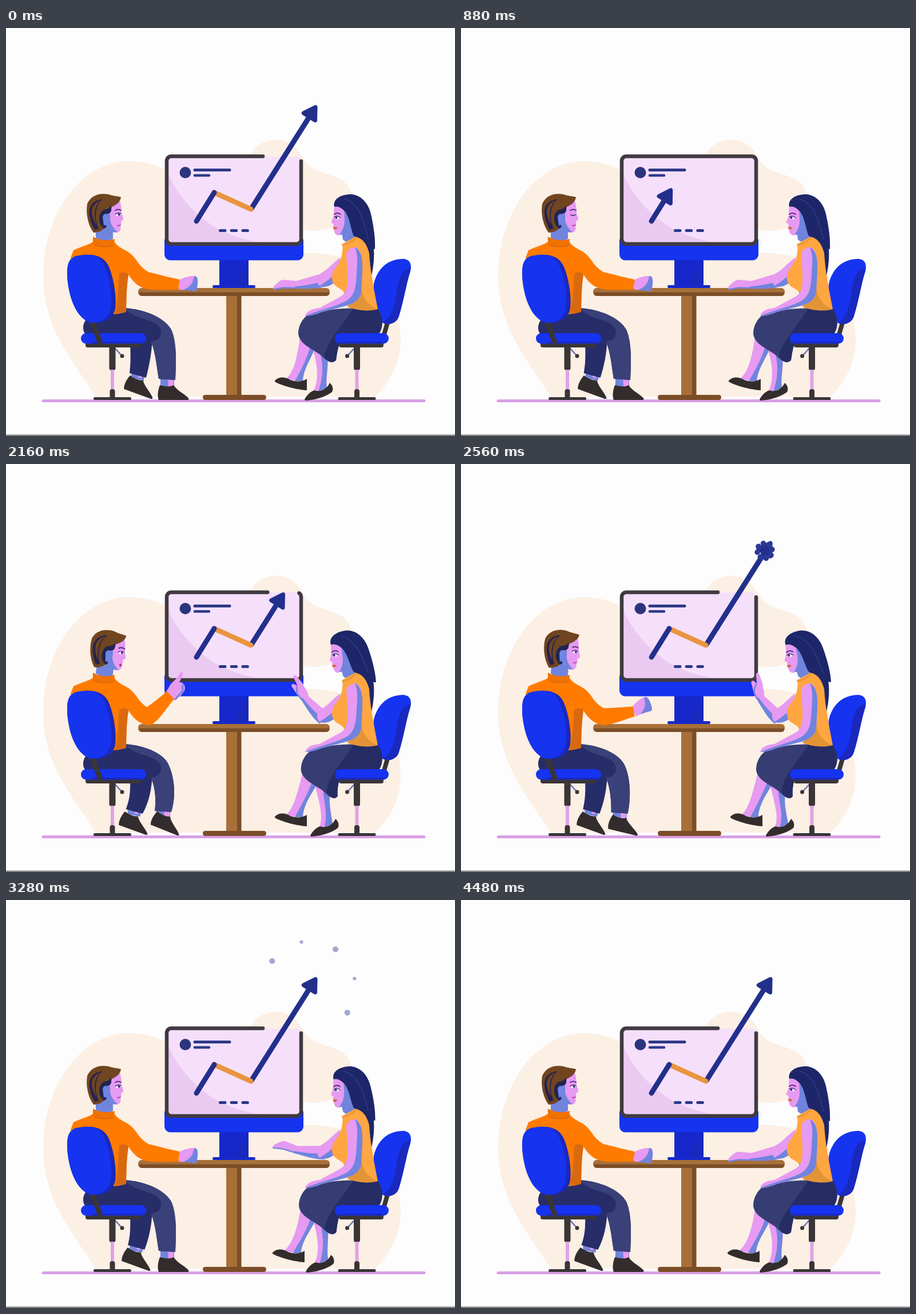
An HTML page with a canvas that plays this animation: 785x714 px, repeating every 4.56 s.

```html
<!DOCTYPE html>
<html lang="en">
<head>
<meta charset="utf-8">
<title>Growth meeting</title>
<style>
html, body { margin: 0; width: 100%; height: 100%; overflow: hidden; background: #fdfdfd; }
canvas { display: block; filter: blur(0.5px); }
</style>
</head>
<body>
<canvas id="stage" width="785" height="714"></canvas>
<script>
const ctx = document.getElementById('stage').getContext('2d');
const LOOP = 4560, STEP = 80, RAD = Math.PI / 180;
const NAVY = '#22308c', BLUE = '#1633f0', DEEP = '#1a28be', DARK = '#3a3536', SHOE = '#332c2c';
const PINK = '#e69af2', SHADE = '#7184dd', ORANGE = '#ff7b00', AMBER = '#ffa640';
const WOOD = '#a87039', BARK = '#7b4e28', HAIR = '#1d2668', LEG = '#3a4179', LEG2 = '#272d68';

// Eased value from a flat list of time, value pairs.
function key(t, ...k) {
  if (t <= k[0]) return k[1];
  for (let i = 2; i < k.length; i += 2) {
    if (t <= k[i]) {
      const u = (t - k[i - 2]) / (k[i] - k[i - 2]);
      return k[i - 1] + (k[i + 1] - k[i - 1]) * u * u * (3 - 2 * u);
    }
  }
  return k[k.length - 1];
}
const ramp = (t, a, b) => Math.min(1, Math.max(0, (t - a) / (b - a)));

function shape(color, d) {
  ctx.fillStyle = color;
  ctx.fill(new Path2D(d));
}
function line(color, width, d, cap = 'round') {
  ctx.strokeStyle = color;
  ctx.lineWidth = width;
  ctx.lineCap = cap;
  ctx.lineJoin = 'round';
  ctx.stroke(new Path2D(d));
}
function box(color, x, y, w, h, r = 0) {
  ctx.fillStyle = color;
  ctx.beginPath();
  ctx.roundRect(x, y, w, h, r);
  ctx.fill();
}
function dot(color, x, y, r) {
  ctx.fillStyle = color;
  ctx.beginPath();
  ctx.arc(x, y, r, 0, 7);
  ctx.fill();
}
function pose(x, y, deg, draw) {
  ctx.save();
  ctx.translate(x, y);
  ctx.rotate(deg * RAD);
  draw();
  ctx.restore();
}
const turn = (x, y, deg, draw) => pose(x, y, deg, () => { ctx.translate(-x, -y); draw(); });

function backdrop() {
  box('#fdfdfd', 0, 0, 785, 714);
  shape('#fcefe4', `M157 645C112 575 62 520 65 425C70 310 140 233 215 233C250 234 272 243 290 255
    L400 300L428 220C440 201 458 195 474 196C500 197 512 212 522 232C535 252 562 254 582 263
    C604 274 611 300 602 322C592 345 565 355 535 355L515 353V394C545 392 580 398 604 407
    C655 432 690 490 690 545C690 585 672 620 645 645Z`);
  line('#d99fe5', 5, 'M65 652.5H731');
  box('#858585', 0, 711.5, 785, 2.5);
}

function monitor(t, gap) {
  box(BLUE, 277, 370, 243, 36.5, [0, 0, 10, 10]);
  box('#1628cc', 373, 406, 51, 47);
  shape('#1a28bb', 'M396 453L424 408V453Z');
  box('#1729cb', 361, 450, 75, 5, 2.5);
  box('#f5dffb', 281, 225, 235, 153, 8);
  shape('#ebcaf1', 'M284 255C298 292 336 334 375 354C405 368 430 373 450 377H284Z');

  const frame = new Path2D('M485 224.5H508A8 8 0 0 1 516 232.5V370A8 8 0 0 1 508 378H289A8 8 0 0 1 281 370V232.5A8 8 0 0 1 289 224.5Z');
  const size = 763;
  ctx.save();
  if (gap > 0) {
    ctx.setLineDash([size - 2 * gap, 2 * gap]);
    ctx.lineDashOffset = -gap;
  }
  ctx.strokeStyle = '#403a40';
  ctx.lineWidth = 6.5;
  ctx.lineCap = 'round';
  ctx.stroke(frame);
  ctx.restore();

  dot('#2c357c', 313.5, 253, 10);
  line('#2c3a86', 5, 'M330 248.5H391');
  line('#2c3a86', 4.5, 'M330 258H355');
  const warm = t >= 1280 && t < 1840;
  for (let i = 0; i < 3; i++) line(i && warm ? '#e8953f' : '#2c3a86', 5, `M${374.5 + i * 19.7} 354.5h8.5`);
}

const LEGS = [
  { x: 333, y: 338, ex: 364, ey: 288, color: NAVY, head: NAVY },
  { x: 364, y: 288, ex: 428, ey: 317, color: '#e8953f', head: '#cb8239' },
  { x: 429, y: 316, ex: 530, ey: 156, color: NAVY, head: NAVY }
];
function arrow(t) {
  let on = 2, reach = 212;
  if (t >= 640 && t < 1200) { on = 0; reach = 66 * ramp(t, 600, 880); }
  else if (t >= 1200 && t < 1840) { on = 1; reach = 78 * ramp(t, 1120, 1520); }
  else if (t >= 1840 && t < 2480) reach = 212 * ramp(t, 1840, 2480);

  for (let i = on; i >= 0; i--) {
    const s = LEGS[i];
    const a = Math.atan2(s.ey - s.y, s.ex - s.x);
    const base = Math.max(0, reach - 24);
    const x = i < on ? s.ex : s.x + Math.cos(a) * base;
    const y = i < on ? s.ey : s.y + Math.sin(a) * base;
    line(s.color, 9, `M${s.x} ${s.y}L${x} ${y}`);
    if (i === on) pose(x, y, a / RAD, () => {
      const k = Math.min(1, reach / 24);
      ctx.scale(k, k);
      shape(s.head, 'M2 -12L22 0L2 12Z');
      line(s.head, 7, 'M2 -12L22 0L2 12Z');
    });
  }
}

function burst(t) {
  const u = ramp(t, 2480, 3440);
  if (u === 0 || u === 1) return;
  const far = 82 * (1 - (1 - u) ** 2);
  for (let i = 0; i < 8; i++) {
    const fade = Math.min(1, i > 4 ? 1.6 - u * 6.4 : (1.06 - u) * 1.9);
    if (fade <= 0) continue;
    const a = (214.5 + i * 45) * RAD;
    ctx.globalAlpha = fade;
    dot('#2c3894', 531 + far * Math.cos(a), 152 + far * Math.sin(a), i % 2 ? 5 - 2.4 * u : 5);
  }
  ctx.globalAlpha = 1;
}

function table() {
  box(WOOD, 385, 467, 20, 177);
  box(BARK, 404, 467, 7.5, 177);
  box(BARK, 344, 642, 111, 9, 4.5);
  box(WOOD, 231, 455, 335, 14, 6);
  box(BARK, 233, 462.5, 332, 6.5, [1, 1, 5, 5]);
}

function stem(x, side) {
  line('#6874bd', 2.5, `M${x + side * 5} 561L${x + side * 16} 573`);
  dot(DARK, x + side * 17, 574, 3.5);
  box(DARK, x - 5.5, 556, 11, 43, 4);
  box('#dfa4e4', x - 3, 598, 6, 36);
  box(DARK, x - 4.5, 632, 9, 17, 4);
  box(DARK, x - 33, 646, 66, 5, 2.5);
}
function leftChair() {
  stem(186, 1);
  box(DARK, 139, 549, 97, 10, 4);
  box(BLUE, 131, 534, 114, 18.5, 9);
  line(DEEP, 3, 'M152 550.5H237');
  line(DARK, 9, 'M150 512L165 552', 'butt');
  shape(DEEP, `M130 398C147 395 168 396 178 414C188 433 194 472 191 491C188 508 174 516 153 516
    C130 512 113 485 108 445C105 415 108 400 130 398Z`);
  shape(BLUE, `M129 398C147 395 162 397 171 414C182 437 187 470 183 490C180 506 168 516 150 516
    C129 512 113 485 108 445C105 415 108 400 129 398Z`);
}
function rightChairBack() {
  line(DARK, 8, 'M668 512L660 540', 'butt');
  shape(BLUE, `M643 448C650 418 670 404 695 404C706 405 710 413 707 426C699 450 695 478 687 504
    C683 518 667 521 657 515C644 504 640 475 643 448Z`);
  shape(DEEP, `M707 420C700 450 695 478 687 504C683 518 667 521 659 516C682 500 680 470 686 445
    C690 430 696 422 707 420Z`);
}
function rightChairSeat() {
  stem(613.5, -1);
  box(DARK, 582, 549, 78, 10, 4);
  box(BLUE, 575, 534, 94, 18.5, 9);
  line(DEEP, 3, 'M584 550.5H660');
}

// Shoe with its toe tip at the local origin.
function shoe(x, y, deg) {
  pose(x, y, deg, () => shape(SHOE, 'M-53 0C-56 -8 -54 -18 -51 -26C-44 -24 -34 -22 -27 -26C-21 -16 -6 -10 0 -2L-2 0Z'));
}

function manHead(lean, blink, talk) {
  turn(171, 366, lean * 8, () => {
    shape(SHADE, 'M157 345L187 345L187 369C178 374 164 373 157 368Z');
    shape(PINK, `M178 308L199 303C202 311 202 319 202 323C203 328 206 333 205 336L201 338
      C202 341 202 344 200 346C202 352 199 358 193 358C185 358 178 352 173 342Z`);
    shape(SHADE, 'M172 318C181 318 183 326 182 337C184 346 189 352 195 357C186 359 176 355 169 345Z');
    shape('#704520', `M153 358C144 346 139 325 142 308C148 293 163 288 179 291C186 294 194 294 201 296
      C200 304 194 309 185 313C183 319 182 321 180 325C175 320 169 322 168 331C167 339 170 345 172 350
      C167 356 160 358 153 358Z`);
    shape('#232350', 'M162 351C155 335 154 313 168 300C159 300 148 306 146 319C145 333 151 345 155 353Z');
    shape('#704520', 'M158 344C153 327 154 313 165 302C156 305 150 312 150 321C150 331 154 339 158 344Z');
    shape('#202452', 'M172 351C162 345 160 329 168 320C174 316 179 319 183 311C187 323 180 325 177 325C170 330 171 340 176 348Z');
    shape('#6f86e4', 'M169 331C170 324 177 323 178 330C178 338 175 345 171 346Z');
    line('#523382', 2, 'M191 319Q196 316 201 319');
    if (blink) line('#523382', 1.8, 'M192 327Q196 329 200 327');
    else {
      shape('#fff', 'M191 328Q196 322 201 326Q197 331 191 328Z');
      dot('#2b2f75', 197.5, 326.5, 2);
      line('#523382', 1.4, 'M191 326Q196 322 201 325');
    }
    if (talk) dot('#a83d8f', 198, 348, 2.4);
    else line('#b04b9f', 1.8, 'M195 346L200 345');
  });
}

function man(t) {
  const lean = key(t, 960, 0, 1520, 0.62, 2160, 1, 2560, 0.62, 3120, 0);
  const point = key(t, 1000, 0, 1400, 1, 2240, 1, 2760, 0);
  const step = key(t, 0, 0, 880, -2, 1520, -5, 2160, -9, 2560, -4, 3280, -4, 4480, -8);
  const hem = -7 * lean, lift = -7 * lean, knee = -4 * lean;

  shape(SHADE, `M${219 + step * 0.7} 598h25l-3 19l-22 -4Z`);
  line(PINK, 6, `M${235 + step * 0.7} 606l-1 6`, 'butt');
  shoe(256 + step, 650, 20);
  shape(LEG2, `M217 540H256C255 570 250 592 ${245 + step * 0.7} 612L${216 + step * 0.7} 604C219 580 217 565 217 540Z`);

  shape(SHADE, `M${270 + hem} ${608 + lift}h24v20h-24Z`);
  shape(PINK, `M${283 + hem} ${608 + lift}h10v20h-9Z`);
  shoe(320 - 18 * lean, 651, 22 * lean);
  shape(LEG2, `M137 515C145 499 180 492 207 490C245 492 278 508 ${289 + knee} 528
    C${298 + knee} 548 298 580 ${296 + hem} ${616 + lift}L${267 + hem} ${614 + lift}
    C263 590 261 565 253 548L235 536H139C134 530 134 522 137 515Z`);
  shape(LEG, `M207 491C248 494 278 508 ${289 + knee} 528C${298 + knee} 548 298 580 ${296 + hem} ${616 + lift}
    L${267 + hem} ${614 + lift}C263 590 261 565 253 548C270 550 279 530 262 518C247 508 229 510 207 491Z`);

  shape(ORANGE, `M118 389C134 381 148 379 153 373H189C193 381 202 385 211 391L226 412L214 432
    C210 460 210 480 210 497C190 503 170 500 150 508L113 402Z`);
  shape('#d9690f', 'M198 430C205 425 212 428 214 431C210 455 211 480 210 497L190 500C196 480 196 455 198 430Z');

  manHead(lean, t >= 800 && t < 960, t >= 1440 && t < 2320 && t % 640 < 320);
  shape('#f07200', 'M152 365C163 372 179 373 190 369L189 381C177 384 163 383 152 379Z');
  line('#d9690f', 2, 'M155 380Q171 385 188 381');

  shape(ORANGE, `M185 384C203 383 218 392 227 405C236 419 246 427 260 432L252 457
    C232 457 219 441 211 426L188 412Z`);
  pose(249, 442, 7.5 - 51.5 * point, () => {
    if (point > 0.45) {
      shape(PINK, 'M50 -9L65 -13C71 -15 76 -12 92 -16C98 -17 98 -12 93 -10L81 -6C86 0 84 8 77 11L66 13L50 10Z');
      line(SHADE, 3, 'M55 11L75 9L81 2');
    } else turn(54, 0, -24 * point, () => {
      shape(PINK, 'M53 -8C62 -14 70 -18 81 -19C87 -16 87 -3 85 6L55 9Z');
      shape(SHADE, 'M78 -17C83 -20 87 -15 86 4L84 8H63C72 2 78 -3 78 -17Z');
    });
    shape(ORANGE, 'M-3 -15C15 -13 38 -10 54 -9V9C35 11 17 16 0 15C-18 14 -18 -12 -3 -15Z');
  });
}

function womanHead(lean, blink) {
  shape(HAIR, 'M617 345L640 372C646 390 643 415 639 434C636 415 630 395 620 382Z');
  turn(602, 367, lean * -7, () => {
    shape(SHADE, 'M584 340H607L610 371C601 378 592 374 589 370Z');
    shape(PINK, `M575 309C572 317 574 324 573 328C572 333 568 339 569 341L573 343L572 348
      L574 351C573 357 575 362 581 363C592 361 601 353 606 342L600 315Z`);
    shape(SHADE, 'M592 318C590 331 597 343 583 362C595 362 604 355 609 342Z');
    shape(HAIR, `M574 313C571 300 584 291 604 291C624 293 636 311 639 330C643 349 646 369 645 387
      C631 385 615 377 607 362C602 347 601 334 594 323C588 316 582 311 574 313Z`);
    line('#303a8a', 1.5, 'M592 299C614 306 624 328 633 369');
    line('#523382', 2, 'M574 326Q579 322 585 326');
    if (blink) line('#523382', 1.8, 'M574 333Q579 335 584 332');
    else {
      shape('#fff', 'M574 333Q579 327 585 332Q580 337 574 333Z');
      dot('#2b2f75', 577.5, 332, 2);
      line('#523382', 1.4, 'M574 331Q579 327 585 332');
    }
    shape('#d8643c', 'M572 349Q576 347 580 350Q577 353 573 353Z');
  });
}

function woman(t) {
  const lean = key(t, 1680, 0, 2160, 0.92, 2560, 1, 3280, 0.2, 3600, 0);
  const raise = key(t, 1640, -9, 2080, 48, 2640, 50, 3280, 7, 3600, -9);
  const bend = key(t, 2080, 8, 2560, 27);
  const step = key(t, 0, 0, 880, -2, 1520, -4, 2160, 0, 2560, 1, 3280, -4, 4480, -4);
  const k = 5 * lean, f = 11 * lean;

  // Far arm: flat hand on the table, or a raised pointing hand.
  pose(552, 442, raise, () => {
    if (raise > 24) {
      pose(-48, 0, bend, () => {
        shape(PINK, 'M6 -7C-6 -13 -11 -8 -18 -11L-35 -9C-41 -8 -41 -4 -36 -3L-21 -1L-27 3C-30 7 -26 9 -21 8L-8 8L6 6Z');
        line(SHADE, 2.5, 'M-20 1L-10 7L2 6');
      });
    } else {
      shape(PINK, 'M-43 -6L-66 -12C-75 -12 -78 -6 -84 -4L-87 2L-67 1L-43 6Z');
      line(SHADE, 2.5, 'M-85 2L-67 2L-45 6');
    }
    shape(PINK, 'M4 -12C-12 -11 -29 -8 -46 -6V6C-25 10 -7 13 5 11Z');
    shape(SHADE, 'M-48 3C-28 4 -12 4 7 0L7 11C-8 14 -28 10 -47 7Z');
  });
  shape(PINK, 'M584 402C571 411 563 423 549 430C541 437 543 450 552 453C565 453 574 443 585 429Z');
  shape(SHADE, 'M585 420C575 431 563 443 548 451C562 457 576 447 588 432Z');

  const a = step * 0.8;
  shape(PINK, `M${514 + k} 540L${542 + k} 556C535 576 ${520 + a} 596 ${516 + a} 618L${488 + a} 615
    C${503 + a} 604 509 578 ${514 + k} 540Z`);
  shape(SHADE, `M${533 + k} 550L${542 + k} 556C535 576 ${520 + a} 596 ${519 + a} 618H${505 + a}
    C${517 + a} 596 529 574 ${533 + k} 550Z`);
  shape(SHOE, `M${470 + step} 617C${478 + step} 609 ${489 + step} 611 ${497 + step} 616
    C${508 + step} 620 ${518 + step} 619 ${526 + step} 614L${526 + step} 634C${510 + step} 633 ${484 + step} 627 ${470 + step} 619Z`);
  shape(PINK, `M${535 + k} 558L${562 + k} 575C564 594 ${559 + f} 612 ${561 + f} 631L${537 + f} 637
    C${547 + f} 617 546 590 ${535 + k} 558Z`);
  shape(SHADE, `M${550 + k} 572L${562 + k} 577C564 596 ${558 + f} 612 ${561 + f} 630L${546 + f} 637
    C${554 + f} 612 555 592 ${550 + k} 572Z`);
  shape(SHOE, `M${522 + f} 650C${526 + f} 642 ${533 + f} 636 ${539 + f} 634
    C${550 + f} 638 ${561 + f} 632 ${566 + f} 621C${571 + f} 625 ${573 + f} 632 ${570 + f} 637C${558 + f} 646 ${540 + f} 651 ${523 + f} 652Z`);

  shape('#363d73', `M${528 + k} 502C560 491 603 488 650 492C660 504 660 525 652 535L592 536
    C581 548 579 569 ${577 + k * 0.6} 581C${571 + k} 589 ${560 + k} 583 ${552 + k} 574
    C${539 + k} 562 ${513 + k} 555 ${511 + k} 535C${511 + k} 520 ${519 + k} 508 ${528 + k} 502Z`);
  shape('#262c64', `M608 490L650 492C660 504 660 525 652 535L592 536C581 548 579 569 ${577 + k * 0.6} 581
    C${571 + k} 589 ${560 + k} 583 ${556 + k} 574C563 546 585 526 608 490Z`);

  womanHead(lean, t >= 1440 && t < 1600);
  shape(AMBER, `M588 378C595 373 604 370 610 365C623 367 631 378 635 394C637 428 644 460 650 492
    C630 497 612 493 597 488C603 473 592 460 580 454C567 446 568 432 575 421C585 409 590 395 588 378Z`);
  shape('#e29436', 'M622 458C624 474 634 486 650 492C630 497 612 493 597 488L612 474Z');
  line('#e29436', 2, 'M588 380Q599 379 612 367');
  shape('#e29436', 'M597 450L602 474L590 462Q597 459 597 450Z');
  shape(PINK, `M595 397C596 387 605 383 613 384C622 391 624 407 623 426L621 463C619 475 609 482 595 486
    L560 495C549 497 542 503 523 504C526 494 536 491 548 490L585 470C596 464 598 449 597 430Z`);
  shape(SHADE, `M610 384C622 389 624 408 623 426L621 463C619 475 609 482 595 486L560 495C549 497 542 503 523 504
    C544 494 571 490 594 478C609 470 612 455 613 430C614 411 616 398 610 384Z`);
}

function render(now) {
  const t = Math.floor((now % LOOP) / STEP) * STEP;
  const gap = t < 640 ? 36 : 36 * ramp(t, 1960, 2220);
  backdrop();
  monitor(t, gap);
  arrow(t);
  burst(t);
  table();
  rightChairBack();
  man(t);
  leftChair();
  woman(t);
  rightChairSeat();
}

const start = performance.now();
function tick() {
  render(performance.now() - start);
  requestAnimationFrame(tick);
}
tick();
</script>
</body>
</html>
```
